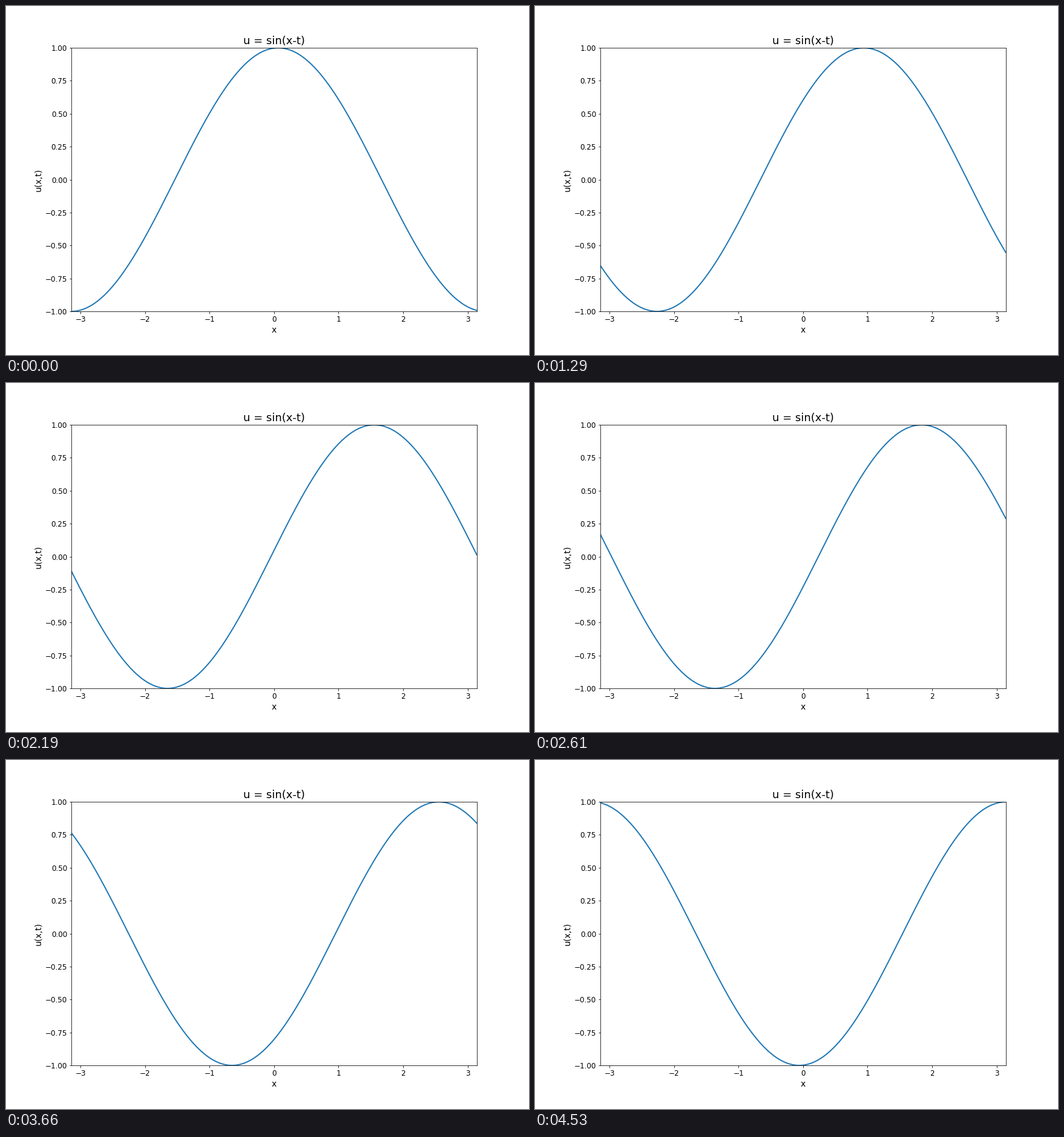
Animation of 864x576 px, one loop 4560 ms. Source, as a matplotlib script:

```python
import numpy as np
import matplotlib.pyplot as plt
from matplotlib.animation import FuncAnimation

FRAMES = 152
INTERVAL = 30   # ms
DT = 0.02       # phase step per frame
K = 0.98        # wave number, slightly less than one period across the axes

plt.rcParams["font.family"] = "DejaVu Sans"

fig, ax = plt.subplots(figsize=(12, 8), dpi=72)
fig.subplots_adjust(left=0.125, right=0.9, bottom=0.125, top=0.88)
ax.set_xlim(-np.pi, np.pi)
ax.set_ylim(-1, 1)
ax.set_xticks(np.arange(-3, 4))
ax.set_yticks(np.linspace(-1, 1, 9))
ax.tick_params(labelsize=12)
ax.set_xlabel("x", fontsize=14)
ax.set_ylabel("u(x,t)", fontsize=14)
ax.set_title("u = sin(x-t)", fontsize=18)

x = np.linspace(-np.pi, np.pi, 400)


def wave(t):
    return -np.cos(K * (x + np.pi) - t)


line, = ax.plot(x, wave(0), color="#1f77b4", lw=2)


def update(frame):
    line.set_ydata(wave(DT * frame))
    return line,


anim = FuncAnimation(fig, update, frames=FRAMES, interval=INTERVAL,
                     repeat=True, repeat_delay=0)
plt.show()
```
